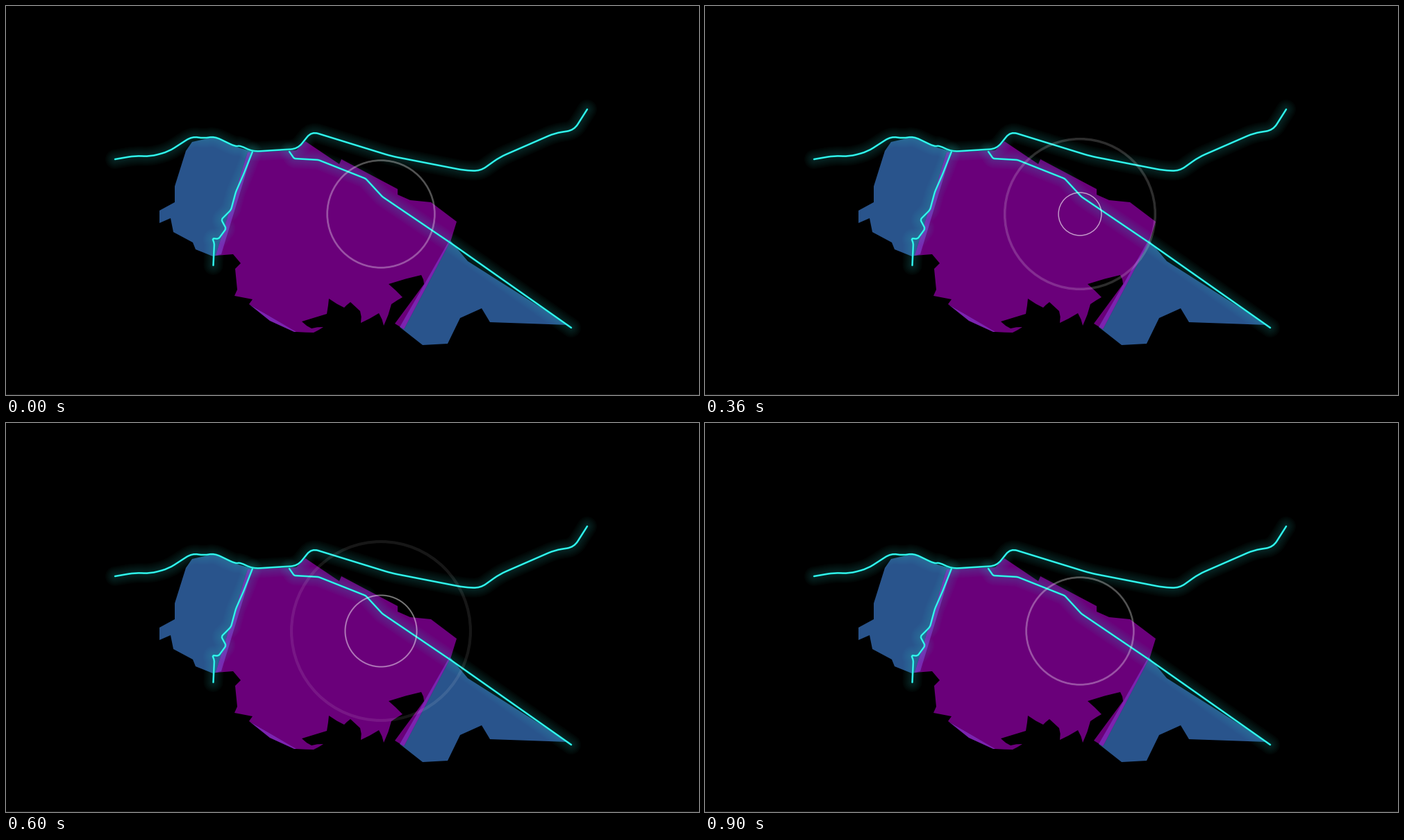
Recreate the animation shown at these times as a matplotlib script. Size 998 by 561 pixels, loop 0.93 s.

```python
import numpy as np
import matplotlib.pyplot as plt
from matplotlib.animation import FuncAnimation
from matplotlib.patches import Circle, PathPatch, Polygon, Rectangle
from matplotlib.path import Path

W, H, DPI = 998, 561, 100
FRAMES, STEP_MS = 31, 30
CENTER = (540, 300)
GROWTH = 2.578          # ring growth in pixels per frame
CYCLE = 30              # frames between two rings
BLUE, PURPLE, LILAC = "#29548c", "#6a007a", "#7c23b0"
CYAN, CORE, GLOW = "#14dcd6", "#48fff4", "#30e0d8"

rng = np.random.default_rng(4)


def px(width):
    """Pixels to points."""
    return width * 72 / DPI


def ragged(points, rough=1.2):
    """Break each side at its middle with a small random shift."""
    pts = np.array(points, float)
    mids = (pts[:-1] + pts[1:]) / 2 + rng.uniform(-rough, rough, (len(pts) - 1, 2))
    out = np.empty((2 * len(pts) - 1, 2))
    out[::2], out[1::2] = pts, mids
    return [tuple(p) for p in out]


def rounded(points, reach):
    """Path through the points with its corners rounded."""
    pts = np.array(points, float)
    verts, codes = [pts[0]], [Path.MOVETO]
    for before, corner, after in zip(pts, pts[1:], pts[2:]):
        ends = []
        for other in (before, after):
            side = other - corner
            ends.append(corner + side * min(0.5, reach / np.hypot(*side)))
        verts += [ends[0], corner, ends[1]]
        codes += [Path.LINETO, Path.CURVE3, Path.CURVE3]
    return Path(verts + [pts[-1]], codes + [Path.LINETO])


west = [(268, 196), (300, 189), (331, 203), (355, 210), (310, 358), (298, 361),
        (273, 351), (269, 341), (241, 326), (237, 306), (221, 313), (221, 295),
        (243, 283), (243, 260), (259, 209)]
east = [(639, 337), (665, 368), (810, 460), (697, 456), (685, 436), (654, 450),
        (636, 487), (600, 489), (567, 463), (602, 402)]
inland = [(348, 211), (418, 208), (431, 195), (480, 228), (483, 221), (564, 264),
          (564, 272), (582, 280), (612, 283), (649, 311), (641, 337), (573, 466),
          (560, 458)]
coast = [(602, 401), (598, 388), (551, 401), (571, 420), (555, 430), (544, 461),
         (537, 443), (511, 457), (510, 440), (496, 427), (487, 435), (465, 422),
         (462, 444), (426, 455), (440, 465), (457, 463), (443, 471), (418, 470)]
bay = [(350, 430), (355, 423), (329, 418), (333, 409), (330, 379), (338, 371),
       (327, 358), (302, 360)]
south_tip = [(350, 430), (380, 454), (415, 470), (420, 470)]

north_line = [(157, 221), (186, 216), (208, 217), (234, 210), (268, 188),
              (285, 191), (300, 188), (331, 203), (337, 201), (355, 210),
              (420, 206), (440, 181), (555, 216.5), (660, 237), (683, 238),
              (711, 218), (790, 183.5), (818, 179), (837, 149)]
west_line = [(355, 210), (342, 243), (331, 268), (324, 294), (310, 308),
             (317, 321), (306, 336), (297, 335), (300, 342), (298.5, 374)]
east_line = [(408, 210), (415, 220), (450, 222), (518, 249), (542, 275),
             (640, 341.5), (814, 464)]

fig = plt.figure(figsize=(W / DPI, H / DPI), dpi=DPI, facecolor="black")
ax = fig.add_axes([0, 0, 1, 1])
ax.set_xlim(0, W)
ax.set_ylim(H, 0)
ax.axis("off")


def area(points, color):
    return ax.add_patch(Polygon(points, facecolor=color, edgecolor="none"))


def glow_line(points, reach):
    path = rounded(points, reach)

    def stroke(width, color, alpha=1.0):
        ax.add_patch(PathPatch(path, fill=False, edgecolor=color, alpha=alpha,
                               lw=px(width), capstyle="round", joinstyle="round"))

    for width in range(28, 3, -4):
        stroke(width, GLOW, 0.026)
    stroke(2.6, CYAN)
    stroke(1.1, CORE)


area(west, BLUE)
area(east, BLUE)
area(south_tip, LILAC)
middle = area(inland + ragged(coast) + bay, PURPLE)
for region in (west, east):
    area(region, LILAC).set_clip_path(middle)

glow_line(north_line, 10)
glow_line(west_line, 3)
glow_line(east_line, 2)
ax.add_patch(Rectangle((0, H - 1), W, 1, color="#1c1c1c", lw=0))


class Ring:
    """Two close circles that spread and fade as they grow."""

    def __init__(self):
        self.edges = [Circle(CENTER, 0, fill=False, edgecolor="white", zorder=5)
                      for _ in range(2)]
        for edge in self.edges:
            ax.add_patch(edge)

    def set_age(self, age):
        r = GROWTH * age
        for edge, side in zip(self.edges, (-1, 1)):
            edge.set_radius(r * (1 + 0.008 * side))
            edge.set_linewidth(px(0.8 + r / 100))
            edge.set_alpha(0.57 * (1 - age / (2 * CYCLE)))
            edge.set_visible(age > 0)


rings = [Ring(), Ring()]


def update(i):
    for k, ring in enumerate(rings):
        ring.set_age(i % CYCLE + k * CYCLE)
    return [edge for ring in rings for edge in ring.edges]


anim = FuncAnimation(fig, update, frames=FRAMES, interval=STEP_MS,
                     repeat=True, repeat_delay=0, blit=False)
plt.show()
```
